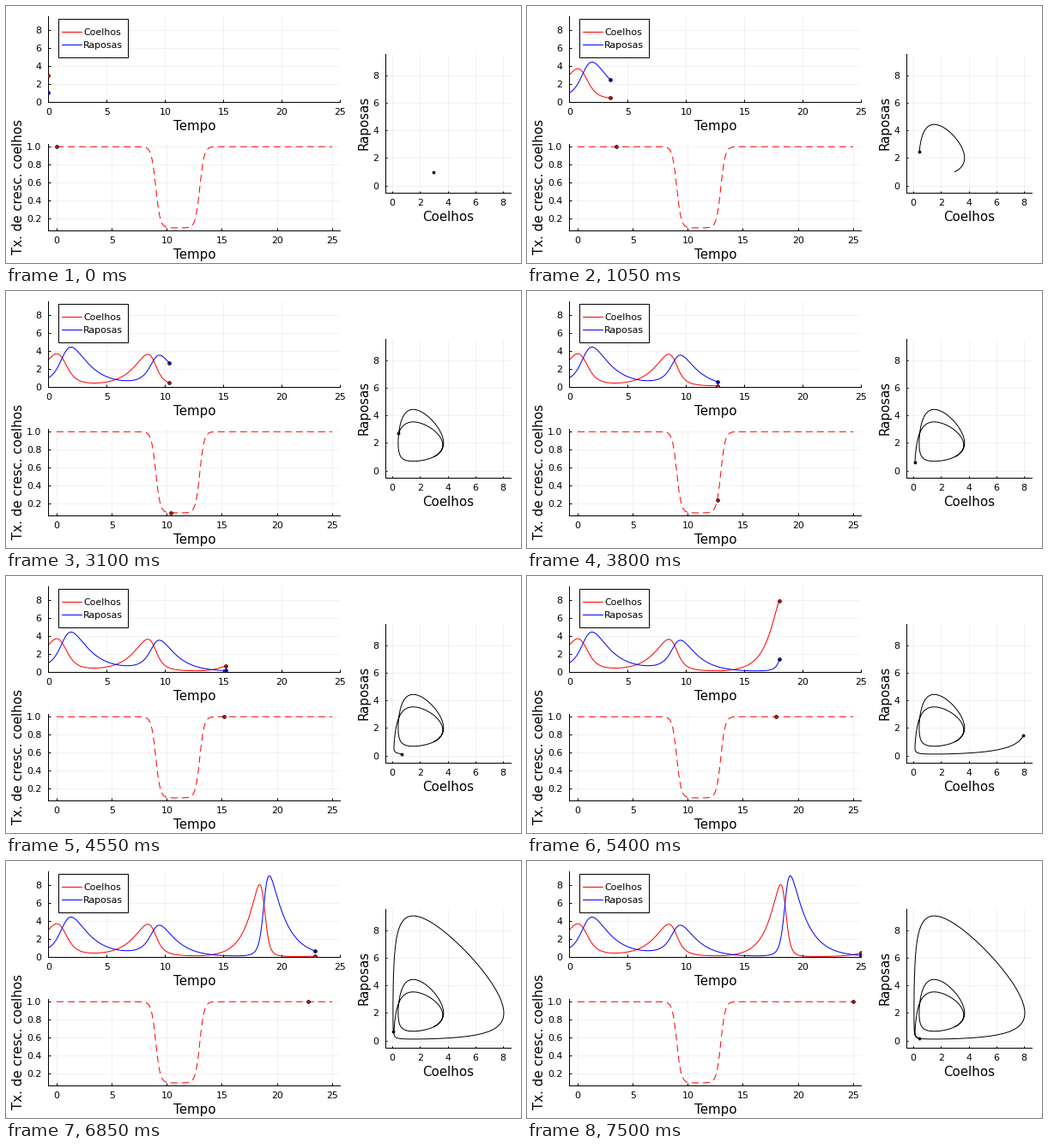
Write a matplotlib script that moves like this. It is 600 px wide and 300 px high and loops after 7.55 s.

```python
import numpy as np
import matplotlib.pyplot as plt
from matplotlib.animation import FuncAnimation
from matplotlib.patches import Rectangle

W, H, DPI = 600, 300, 100
PX = 72 / DPI                      # one pixel in points
FRAMES, INTERVAL, T_END = 151, 50, 25
FINE = 4                           # curve samples per frame
TICK_FONT, LABEL_FONT = 11 * PX, 15 * PX

plt.rcParams["font.family"] = "DejaVu Sans"


def growth(t):
    """Rabbit growth rate, with a smooth dip between t = 9 and t = 13."""
    return 1 - 0.45 * (np.tanh(2.5 * (t - 9)) - np.tanh(2.5 * (t - 13)))


def rates(t, s):
    x, y = s
    return np.array([growth(t) * x - 0.5 * x * y, 0.5 * x * y - 0.75 * y])


def solve(times, start, sub=5):
    """Classic RK4 with a few substeps between the saved times."""
    out = [np.array(start, float)]
    h = (times[1] - times[0]) / sub
    for t0 in times[:-1]:
        s = out[-1]
        for k in range(sub):
            t = t0 + k * h
            k1 = rates(t, s)
            k2 = rates(t + h / 2, s + h / 2 * k1)
            k3 = rates(t + h / 2, s + h / 2 * k2)
            k4 = rates(t + h, s + h * k3)
            s = s + h / 6 * (k1 + 2 * k2 + 2 * k3 + k4)
        out.append(s)
    return np.array(out).T


times = np.linspace(0, T_END, (FRAMES - 1) * FINE + 1)
rabbits, foxes = solve(times, (3, 1))
x_top, y_top = rabbits.max() + 0.5, foxes.max() + 0.5

fig = plt.figure(figsize=(W / DPI, H / DPI), dpi=DPI, facecolor="white")


def panel(left, top, right, bottom, xlim, ylim, xticks, yticks, tick):
    ax = fig.add_axes([left / W, 1 - bottom / H,
                       (right - left) / W, (bottom - top) / H])
    ax.set(xlim=xlim, ylim=ylim, xticks=xticks, yticks=yticks)
    ax.patch.set_visible(False)
    ax.spines[["top", "right"]].set_visible(False)
    for side in ("left", "bottom"):
        ax.spines[side].set_linewidth(PX)
    ax.set_axisbelow(True)
    ax.grid(color="black", alpha=0.1, lw=0.5 * PX)
    ax.tick_params(direction="in", length=tick * PX, width=PX,
                   labelsize=TICK_FONT)
    ax.tick_params(axis="x", pad=7 * PX)
    ax.tick_params(axis="y", pad=8 * PX)
    return ax


def dot(ax, color, size=3.7, clip=True):
    return ax.plot([], [], "o", ms=size * PX, mfc=color, mec="black",
                   mew=0.8 * PX, zorder=3, clip_on=clip)[0]


def curve(ax, color):
    return ax.plot([], [], color=color, lw=PX)[0]


fives = range(0, 26, 5)
evens = range(0, 9, 2)
pad = 0.03 * T_END
series = panel(49.4, 12, 389.4, 111.8, (0, T_END), (0, y_top),
               fives, evens, 2.7)
rate = panel(49.4, 161.4, 389.4, 261.8, (-pad, T_END + pad), (0.073, 1.027),
             fives, [0.2, 0.4, 0.6, 0.8, 1.0], 2.7)
phase = panel(442.2, 56, 588, 217.6, (-0.5, x_top), (-0.5, y_top),
              evens, evens, 1.6)

rate.plot(times, growth(times), color="red", lw=PX,
          dashes=(8, 5), dash_capstyle="butt")

rabbit_line, fox_line = curve(series, "red"), curve(series, "blue")
phase_line = curve(phase, "black")
rabbit_dot, fox_dot = dot(series, "red"), dot(series, "blue")
rate_dot = dot(rate, "red")
phase_dot = dot(phase, "black", size=3, clip=False)

# Overlay in pixel coordinates for the legend and axis titles
over = fig.add_axes([0, 0, 1, 1], zorder=5)
over.set(xlim=(0, W), ylim=(H, 0))
over.axis("off")


def title(x, y, text, angle=0):
    over.text(x, y, text, size=LABEL_FONT, ha="center", va="baseline",
              rotation=angle, rotation_mode="anchor")


title(220, 145, "Tempo")
title(220, 295, "Tempo")
title(515, 251, "Coelhos")
title(19, 211.5, "Tx. de cresc. coelhos", 90)
title(421, 136.5, "Raposas", 90)

over.add_patch(Rectangle((61.2, 15.2), 81, 45, fc="white", ec="black", lw=PX))
for y, color, name in ((30.3, "red", "Coelhos"), (45.3, "blue", "Raposas")):
    over.plot([65, 88], [y, y], color=color, lw=PX)
    over.text(90, y + 4, name, size=TICK_FONT, va="baseline")


def update(i):
    n = i * FINE + 1
    t, x, y = times[:n], rabbits[:n], foxes[:n]
    for line, end, u, v in ((rabbit_line, rabbit_dot, t, x),
                            (fox_line, fox_dot, t, y),
                            (phase_line, phase_dot, x, y)):
        line.set_data(u, v)
        end.set_data(u[-1:], v[-1:])
    rate_dot.set_data(t[-1:], growth(t[-1:]))
    return (rabbit_line, fox_line, phase_line,
            rabbit_dot, fox_dot, phase_dot, rate_dot)


anim = FuncAnimation(fig, update, frames=FRAMES, interval=INTERVAL,
                     repeat=True, repeat_delay=0)
plt.show()
```
